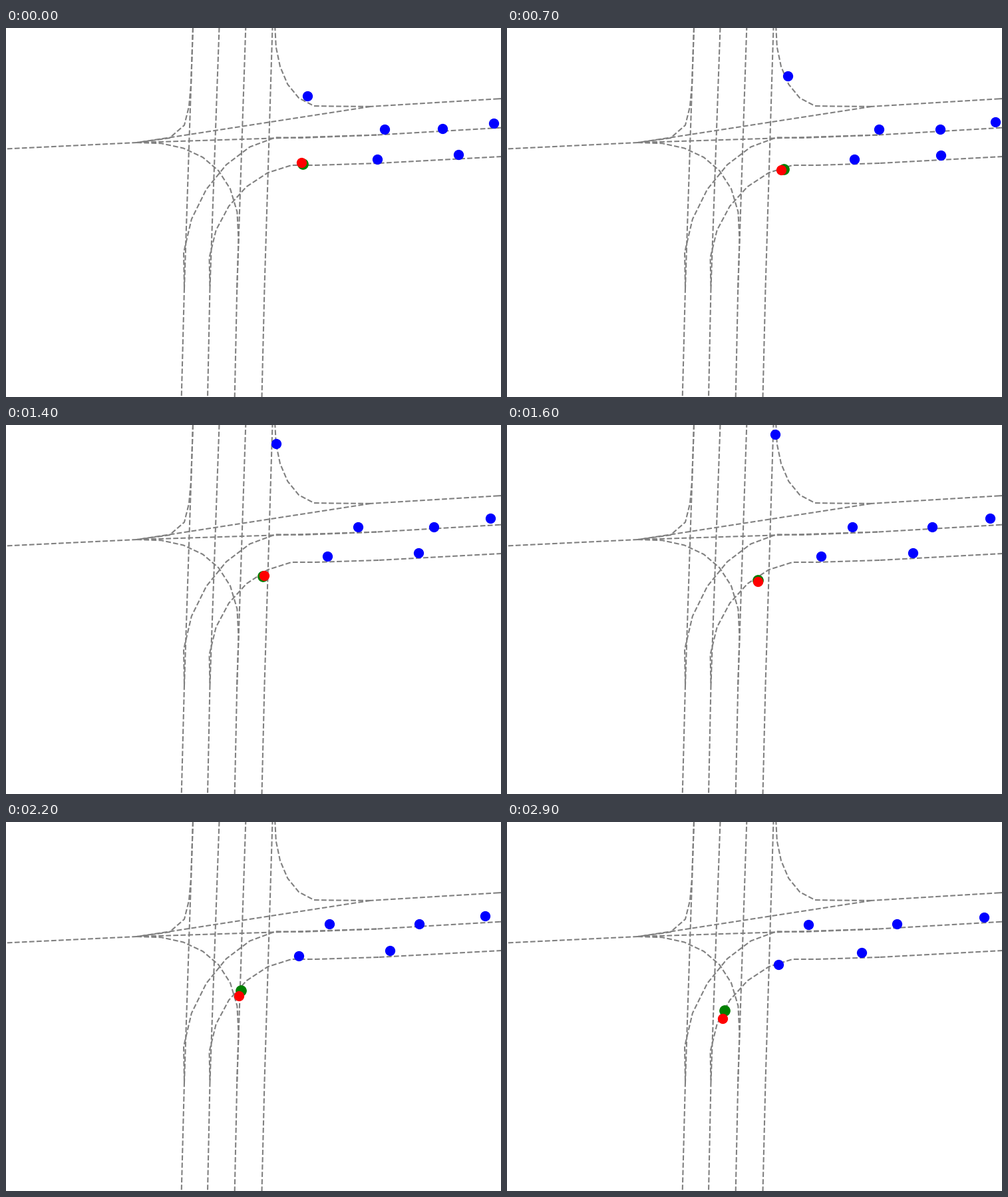
Animation of 744 by 554 pixels, one loop 3 s. Source, as a matplotlib script:

```python
import numpy as np
import matplotlib.pyplot as plt
from matplotlib.animation import FuncAnimation

W, H, DPI = 744, 554, 100
FRAMES, INTERVAL = 30, 100
STEPS = np.arange(FRAMES)
POSES = [0, 7, 18, 29]  # steps at which each path is pinned

fig = plt.figure(figsize=(W / DPI, H / DPI), dpi=DPI, facecolor="white")
ax = fig.add_axes([0, 0, 1, 1])
ax.set_xlim(0, W)
ax.set_ylim(H, 0)
ax.axis("off")


def lane(*points):
    """Dashed centre line, drawn in the driving direction."""
    ax.plot(*np.array(points).T, "--", color="gray", lw=1.5)


def bend(a, b, c, d, n):
    """Cubic Bezier curve cut into n straight pieces."""
    t = np.linspace(0, 1, n + 1)[:, None]
    a, b, c, d = np.array([a, b, c, d], float)
    return ((1 - t) ** 3 * a + 3 * t * (1 - t) ** 2 * b
            + 3 * t * t * (1 - t) * c + t ** 3 * d)


def dots(color, size):
    return ax.plot([], [], "o", color=color, ms=size, zorder=3)[0]


def path(*points):
    """Cubic motion through the points at the pinned steps."""
    x, y = (np.polyval(np.polyfit(POSES, v, 3), STEPS) for v in zip(*points))
    return np.column_stack([x, y])


# Vertical road: two lanes down, then two lanes up
tops = [(x, -1) for x in (281, 320.5, 360.3, 400.5)]
joints = [(x, 390) for x in (268, 306.5, 347.2, 388.5)]
bottoms = [(x, 555) for x in (263.7, 303, 343.7, 384.5)]
for k, (top, joint, bottom) in enumerate(zip(tops, joints, bottoms)):
    if k < 2:
        lane(top, joint)
        lane(joint, bottom)
    else:
        lane(bottom, joint)
        lane(joint, top)

# Side road: three lanes come in from the right, one leaves to the left
exit_left = (197, 172)
entries = [(740, 106.3), (742.5, 149.8), (745, 193)]
forks = [(548, 117.9), (557, 160.6), (560, 203)]
for (x, y), fork in zip(entries, forks):
    lane((x + 10, y - 0.5), (x, y))
    lane((x, y), fork)
lane(exit_left, (-1, 181.5))
lane(forks[0], exit_left)
lane(forks[1], exit_left)

# Turns between the two roads
lane(tops[0], *bend((278, 85), (271.6, 130.5), (284.7, 173), exit_left, 4))
lane(joints[2], *bend((349.5, 318), (355, 211), (285, 168), exit_left, 7))
lane(forks[0], *bend((492, 117.5), (427, 130), (403, 56.5), (404.3, -1), 6))
lane(forks[1], *bend((444, 165), (354, 144), (249, 265), joints[0], 7))
lane(forks[2], *bend((466, 206), (379, 192), (290, 281), joints[1], 7))

cars = np.stack([
    path((453, 102), (422, 72), (401, -1), (397, -92)),
    path((569, 152), (559, 152), (508, 153), (453, 154)),
    path((656, 151), (651, 152), (634, 153), (586, 153)),
    path((733, 143), (734, 141), (724, 140), (717, 143)),
    path((558, 197), (522, 197), (461, 198), (408, 214)),
    path((680, 190), (652, 191), (599, 192), (533, 196)),
])
actual = path((446, 204), (416, 212), (369, 239), (327, 283))

# The prediction wavers around the actual car, then runs ahead of it
stray = [0, 7, 14, 18, 29]
predicted = actual + np.column_stack([
    np.interp(STEPS, stray, [-2, -4, 2, -3, -3]),
    np.interp(STEPS, stray, [-2, 1, -1, 5, 12]),
])

car_dots = dots("blue", 10)
actual_dot = dots("green", 11)
predicted_dot = dots("red", 10)


def draw(step):
    car_dots.set_data(*np.round(cars[:, step]).T)
    actual_dot.set_data(*np.round(actual[step:step + 1]).T)
    predicted_dot.set_data(*np.round(predicted[step:step + 1]).T)
    return car_dots, actual_dot, predicted_dot


anim = FuncAnimation(fig, draw, frames=FRAMES, interval=INTERVAL, repeat=True)
plt.show()
```
